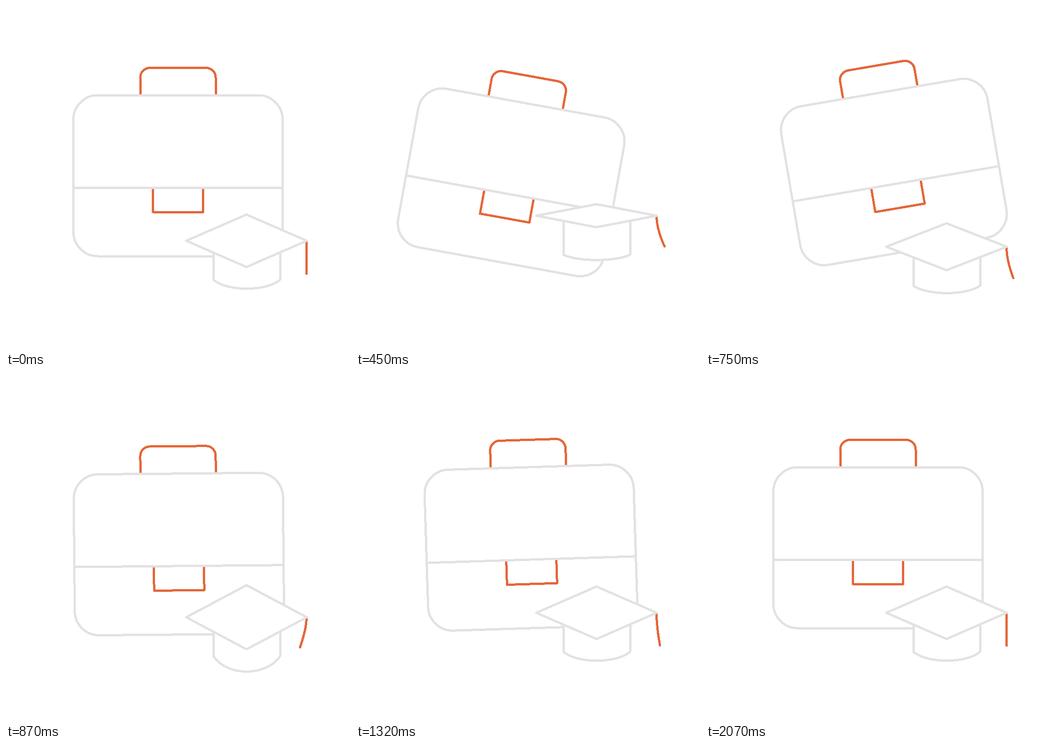
Animation, 748 px wide and 748 px high, one loop 4.17 s. Source, as an HTML page:

```html
<!DOCTYPE html>
<html lang="en">
<head>
<meta charset="utf-8">
<title>Briefcase and cap</title>
<style>
  html, body { margin: 0; width: 100%; height: 100%; overflow: hidden; background: #fff; }
  svg { display: block; width: 100%; height: 100%; }
  .line { fill: none; stroke: #e2e2e2; stroke-width: 5; stroke-linejoin: round; shape-rendering: crispEdges; }
  .accent { stroke: #e4673a; }
  .solid { fill: #fff; }
  .round { stroke-linecap: round; }
</style>
</head>
<body>
<svg viewBox="0 0 748 748">
  <g id="bag">
    <path class="line accent" d="M292 194V155.500A21 21 0 0 1 313 134.500H435A21 21 0 0 1 456 155.500V194"/>
    <path class="line accent" d="M319.500 395V448H428.500V395"/>
    <rect class="line" x="146.500" y="194" width="455" height="350" rx="53"/>
    <path class="line" d="M146.500 395H601.500"/>
  </g>
  <path id="base" class="line solid"/>
  <path id="tassel" class="line accent round"/>
  <path id="board" class="line solid"/>
</svg>
<script>
const LOOP = 4170, STEP = 30, END = 2070;
const $ = id => document.getElementById(id);
const bag = $('bag'), base = $('base'), tassel = $('tassel'), board = $('board');

// Smooth 0 to 1 between two times.
function ease(t, from, to) {
  const k = Math.min(1, Math.max(0, (t - from) / (to - from)));
  return (1 - Math.cos(Math.PI * k)) / 2;
}

// Swing from rest through evenly spaced peaks and back to rest.
function swing(t, first, beat, ...peaks) {
  let value = 0;
  [...peaks, 0].forEach((peak, i) => {
    const to = first + i * beat;
    value += (peak - value) * ease(t, i ? to - beat : 0, to);
  });
  return value;
}

function drawBag(t) {
  const angle = swing(t, 390, 313, 12.3, -10.7, 7.7, -1.8, -0.35);
  const drop = swing(t, 290, 320, 55.5, -20, 17);
  bag.setAttribute('transform', `translate(0 ${drop}) rotate(${angle} 374 164)`);
}

function drawCap(t) {
  // Jump, land a little low, settle; the board flattens in the air.
  const y = 510.5 - 86 * ease(t, 0, 265) + 99 * ease(t, 265, 750) - 13 * ease(t, 750, 1110);
  const h = 57 - 32 * ease(t, 0, 360) + 45 * ease(t, 585, 885) - 13 * ease(t, 885, 1200);
  const rim = y + 84.7;
  const low = rim + (11.5 + 8 * (h / 57) ** 5) * 4 / 3;
  board.setAttribute('d', `M392 ${y}L523 ${y - h}L654 ${y}L523 ${y + h}Z`);
  base.setAttribute('d', `M451 ${y}V${rim}C481 ${low} 566 ${low} 596 ${rim}V${y}`);

  const dx = swing(t, 300, 300, -10, 45, -15.5, 15, -7, 4);
  const dy = 71.5 - 0.0152 * dx * dx + 0.25 * Math.min(dx, 0);
  const bend = y + dy * (0.4 + 0.002 * dx);
  tassel.setAttribute('d', `M653.500 ${y}Q653.500 ${bend} ${653.5 + dx} ${y + dy}`);
}

function draw(t) {
  drawBag(t);
  drawCap(t);
}

const start = performance.now();
function tick() {
  const t = (performance.now() - start) % LOOP;
  draw(Math.min(END, Math.floor(t / STEP) * STEP));
  requestAnimationFrame(tick);
}
draw(0);
requestAnimationFrame(tick);
</script>
</body>
</html>
```
